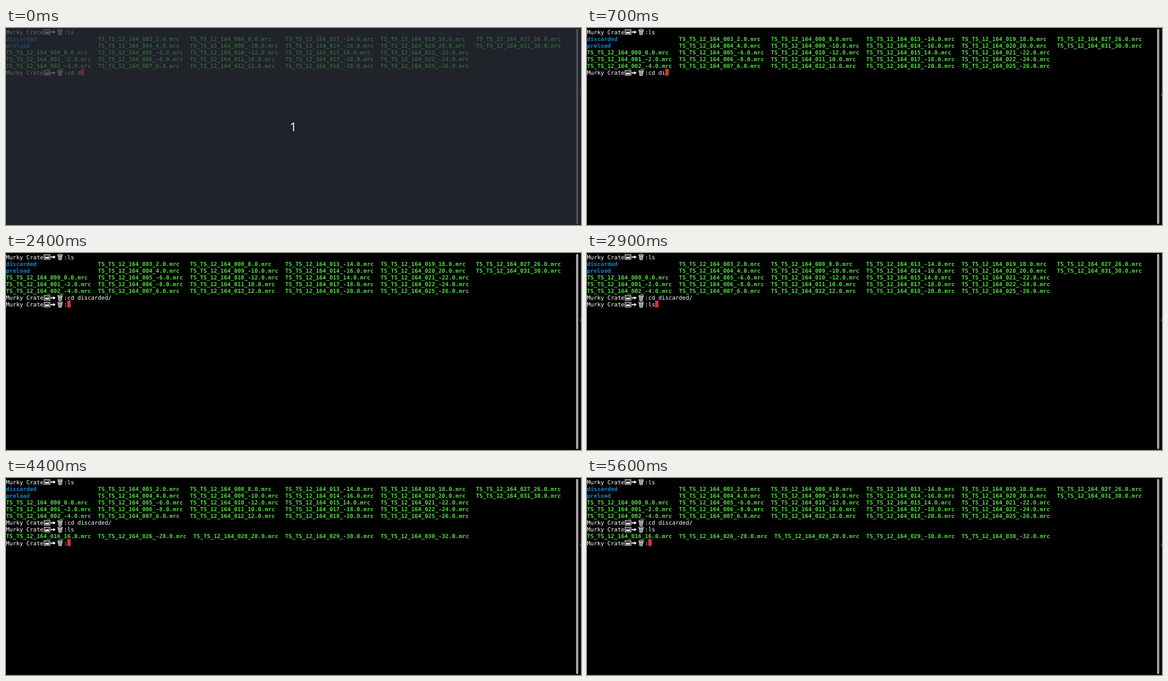
An HTML page that plays this animation: 1275x439 px, repeating every 6.2 s.

```html
<!DOCTYPE html>
<html lang="en">
<head>
<meta charset="utf-8">
<title>Terminal session</title>
<style>
  html, body { margin: 0; width: 100%; height: 100%; overflow: hidden; background: #000; }
  svg { display: block; width: 1275px; height: 439px; }
  text { font: 12.54px "DejaVu Sans Mono", monospace; fill: #fff; white-space: pre; text-rendering: geometricPrecision; }
  .file { fill: #50dc3c; font-weight: bold; }
  .dir { fill: #0a84d0; font-weight: bold; }
  .count { font: 27px "Noto Sans", sans-serif; fill: #f2f0e6; text-anchor: middle; }
</style>
</head>
<body>
<svg id="stage" viewBox="0 0 1275 439">
  <defs>
    <g id="icons">
      <path d="M84.5 3.5h13v11h-13z" fill="#000" stroke="#fff" stroke-width="1.2"/>
      <path d="M86.5 5.5h9v7h-9z" fill="none" stroke="#ddd" stroke-width=".7"/>
      <path d="M87 12V10l2-2.5 2 2 2-1.5 2 2v2z" fill="#fff"/>
      <circle cx="93.4" cy="7.2" r=".8" fill="#fff"/>
      <path d="M99 7.8h6V5.2l5 3.8-5 3.8v-2.6h-6z" fill="#fff"/>
      <path d="M115 5l1.6 10q3.4 1.4 6.8 0L125 5z" fill="#aaa" stroke="#ddd" stroke-width=".6"/>
      <path d="M117.5 7l.7 7.5M120 7v8M122.5 7l-.7 7.5" stroke="#777" stroke-width=".8"/>
      <ellipse cx="120" cy="4.4" rx="5.7" ry="1.7" fill="#333" stroke="#fff"/>
    </g>
  </defs>
  <rect width="1275" height="439"/>
  <path d="M1273.5 0V439M0 438.5H1275" stroke="#17191d"/>
  <rect x="1264" y="2" width="5" height="435" rx="2.5" fill="#a5a5a5"/>
  <path d="M1275 145v6h-2.5" fill="none" stroke="#aaa"/>
  <g id="screen"></g>
  <rect id="cursor" width="7.55" height="15.1" fill="#e0302a"/>
  <g id="countdown">
    <rect width="1275" height="439" fill="#2b2f38" opacity=".75"/>
    <text class="count" x="637" y="229.5">1</text>
  </g>
</svg>
<script>
const CELL = 7.55, LINE = 15.1, LOOP = 6200, PROMPT_END = 18;
const byId = id => document.getElementById(id);
const screen = byId('screen'), cursor = byId('cursor'), countdown = byId('countdown');

function add(parent, tag, attrs, text = '') {
  const node = document.createElementNS('http://www.w3.org/2000/svg', tag);
  for (const key in attrs) node.setAttribute(key, attrs[key]);
  node.textContent = text;
  parent.append(node);
  return node;
}

const write = (parent, row, col, text, kind = 'plain') =>
  add(parent, 'text', { x: col * CELL, y: Math.round(13.6 + row * LINE), class: kind }, text);

const writeFile = (parent, row, col, name) =>
  write(parent, row, col, `TS_TS_12_164_${name}.0.mrc`, 'file');

// Draws a prompt line and returns the text node for its command.
function prompt(parent, row, command = '') {
  write(parent, row, 0, 'Murky Crate');
  add(parent, 'use', { href: '#icons', y: Math.round(row * LINE) });
  write(parent, row, PROMPT_END - 1, ':');
  return write(parent, row, PROMPT_END, command);
}

prompt(screen, 0, 'ls');
write(screen, 1, 0, 'discarded', 'dir');
write(screen, 2, 0, 'preload', 'dir');

// First column, first row, names downwards
const columns = [
  [0, 3, '000_0 001_-2 002_-4'],
  [27, 1, '003_2 004_4 005_-6 006_-8 007_6'],
  [54, 1, '008_8 009_-10 010_-12 011_10 012_12'],
  [82, 1, '013_-14 014_-16 015_14 017_-18 018_-20'],
  [110, 1, '019_18 020_20 021_-22 022_-24 025_-26'],
  [138, 1, '027_26 031_30']
];
for (const [col, top, names] of columns)
  names.split(' ').forEach((name, i) => writeFile(screen, top + i, col, name));

const firstCommand = prompt(screen, 6);
const second = add(screen, 'g', {});
const secondCommand = prompt(second, 7);
const third = add(screen, 'g', {});
const discarded = { 0: '016_16', 27: '026_-28', 55: '028_28', 82: '029_-30', 110: '030_-32' };
for (const col in discarded) writeFile(third, 8, col, discarded[col]);
prompt(third, 9);

// Start time, active row, its command, cursor shown
const steps = [
  [0, 6, 'cd d', true],
  [500, 6, 'cd d', false],
  [600, 6, 'cd d', true],
  [700, 6, 'cd di', true],
  [1100, 6, 'cd discarded/', true],
  [1600, 7, '', true],
  [2100, 7, '', false],
  [2400, 7, '', true],
  [2500, 7, 'l', true],
  [2900, 7, 'ls', true],
  [3300, 9, '', true],
  [3800, 9, '', false],
  [4400, 9, '', true],
  [5000, 9, '', false],
  [5600, 9, '', true]
];

const show = (node, on) => node.setAttribute('visibility', on ? 'visible' : 'hidden');

function draw(time) {
  const [, row, command, blinkOn] = steps.findLast(step => step[0] <= time);
  firstCommand.textContent = row === 6 ? command : 'cd discarded/';
  secondCommand.textContent = row === 7 ? command : 'ls';
  show(second, row >= 7);
  show(third, row === 9);
  cursor.setAttribute('x', (PROMPT_END + command.length) * CELL);
  cursor.setAttribute('y', 0.4 + row * LINE);
  show(cursor, blinkOn);
  show(countdown, time < 100);
}

const start = performance.now();
function tick() {
  draw((performance.now() - start) % LOOP);
  requestAnimationFrame(tick);
}
tick();
</script>
</body>
</html>
```
